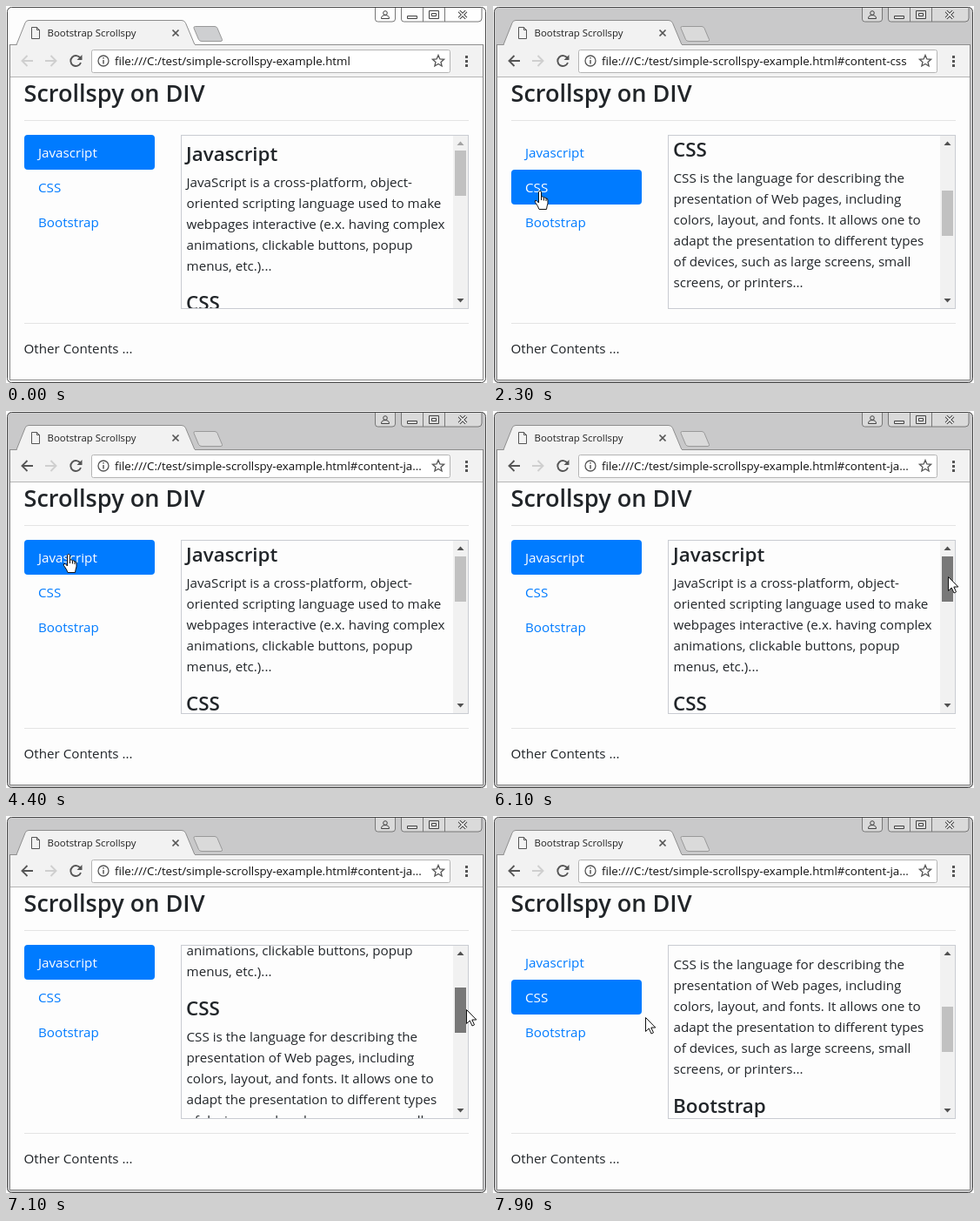
These frames come from a looping animation (553x433 px, 8000 ms). An HTML page:

```html
<!DOCTYPE html>
<html lang="en">
<head>
<meta charset="utf-8">
<title>Bootstrap Scrollspy</title>
<style>
  html, body { margin: 0; width: 100%; height: 100%; overflow: hidden; background: #fdfdfd; }
  svg { display: block; }
  text { font: 15.2px "Open Sans", "Noto Sans", sans-serif; fill: #212529; white-space: pre; }
  .h3 { font-size: 27.1px; font-weight: 600; }
  .h4 { font-size: 22.4px; font-weight: 600; }
  .tab { font-size: 11.4px; fill: #222; }
  .url { font-size: 13.35px; fill: #111; }
  #win { --frame: #fdfdfd; --plus: #cecfd1; }
  #win.focus { --frame: #c9c9ca; --plus: #dadada; }
  .frame { fill: var(--frame); }
  .line { fill: none; stroke: #555; }
  .ctl { fill: none; stroke: #777; }
</style>
</head>
<body>
<svg id="win" width="553" height="433" viewBox="0 0 553 433">
  <rect width="553" height="433" fill="#fdfdfd"/>
  <rect class="frame" x="1.5" y="1.5" width="550" height="431" rx="5" stroke="#444"/>
  <rect x="4.5" y="44.5" width="544" height="385" fill="#fdfdfd" stroke="#8a8a8a"/>

  <!-- window buttons -->
  <g class="ctl">
    <path d="M424.500 2V15q0 3 3 3H444q3.500 0 3.500-3V2M454.500 2V15q0 3 3 3H543q4 0 4-4V2M479.500 2V18M504.500 2V18" fill="#fff" fill-opacity=".3"/>
    <g stroke="#444">
      <circle cx="436" cy="8" r="2.300"/>
      <path d="M431.500 14.500q0-4 4.500-4t4.500 4zM461.500 11.500h11v3h-11zM486.500 5.500h11v9h-11zM489.500 8.500h5v3h-5z"/>
      <path d="M521 6l8 8M529 6l-8 8" stroke-width="3.600"/>
      <path d="M521 6l8 8M529 6l-8 8" stroke="#fff" stroke-width="1.600"/>
    </g>
  </g>

  <!-- tab and toolbar -->
  <rect x="5" y="45" width="543" height="36" fill="#f2f2f2"/>
  <path d="M5 44.500H12L22 19.500Q23 16.500 26 16.500H202Q205 16.500 206.500 19.500L217 44.500H548" fill="#f2f2f2" stroke="#8e8e8e"/>
  <path d="M13 45H217" stroke="#f2f2f2" stroke-width="2"/>
  <path d="M5 81.500H548" stroke="#b6b6b6"/>
  <path d="M217.500 23.500H240q2 0 3 2l5.500 13q.5 2-1.500 2H225q-2.500 0-3.500-2l-5.500-13q-.5-2 1.500-2z" fill="var(--plus)" stroke="#999"/>
  <path class="line" d="M29.500 24.500h6l3 3v10h-9zM35.500 24.500v3h3"/>
  <text class="tab" x="47.500" y="35">Bootstrap Scrollspy</text>
  <path class="line" d="M191.500 27.500l7 7M198.500 27.500l-7 7" stroke-width="1.700"/>
  <g fill="none" stroke-width="1.900">
    <path id="back" d="M31 63H18.500M24.500 57l-6 6 6 6"/>
    <path d="M45 63H57.500M51.500 57l6 6-6 6" stroke="#cfcfcf"/>
    <path d="M85.500 60A6 6 0 1 0 86 65" stroke="#555"/>
    <path d="M87.500 56v6h-6z" fill="#555"/>
  </g>
  <rect x="98.500" y="50.500" width="412" height="26" rx="2" fill="#fff" stroke="#b4b4b4"/>
  <circle class="line" cx="112" cy="63" r="6" stroke-width="1.300"/>
  <path class="line" d="M112 62v4.500M112 59v1.500" stroke-width="1.500"/>
  <text class="url" id="url" x="125" y="68"></text>
  <path class="line" d="M497 56.500l1.900 4.400 4.700.4-3.600 3.100 1.100 4.600-4.100-2.500-4.100 2.500 1.100-4.600-3.600-3.100 4.700-.4z" stroke-width="1.300"/>
  <path d="M529.500 57v3M529.500 62v3M529.500 67v3" stroke="#555" stroke-width="3"/>

  <!-- page -->
  <text class="h3" x="20.500" y="110">Scrollspy on DIV</text>
  <path d="M21 131.500H532M21 364.500H532" stroke="#e4e4e4"/>
  <text x="20.500" y="399">Other Contents ...</text>
  <rect id="pill" x="21" width="150" height="40" rx="4" fill="#007bff"/>
  <g id="nav"></g>
  <rect x="201.500" y="148.500" width="330" height="199" fill="#fdfdfd" stroke="#c9ccd2"/>
  <svg id="view" x="202" y="149" width="313" height="198"></svg>
  <rect x="514" y="149" width="17" height="198" fill="#f1f1f1"/>
  <path id="up" d="M518.500 160h8l-4-4.500z"/>
  <path d="M518.500 336h8l-4 4.500z" fill="#505050"/>
  <rect id="thumb" x="516" width="13" height="52"/>

  <g id="cursor" fill="#fff" stroke="#111" stroke-linejoin="round">
    <path id="arrow" d="M.5.5V16.500l3.700-3.500 2.800 6 2.500-1.200-2.700-5.800h5z"/>
    <path id="hand" d="M-1.500 14V1.500Q0-1 1.500 1.500V7Q3 6 4.500 8 6 7 7 9 9 8.500 9 11V15Q8 17.500 7.500 21.500H-1Q-2 18-5.500 13.500-6.500 10.500-4 11.500L-1.500 14M1.500 7v4M4.500 8v3.500M7 9v3"/>
  </g>
</svg>
<script>
const $ = id => document.getElementById(id);
const sections = [
  ['Javascript', 178, ['JavaScript is a cross-platform, object-', 'oriented scripting language used to make',
    'webpages interactive (e.x. having complex', 'animations, clickable buttons, popup', 'menus, etc.)...']],
  ['CSS', 349, ['CSS is the language for describing the', 'presentation of Web pages, including',
    'colors, layout, and fonts. It allows one to', 'adapt the presentation to different types',
    'of devices, such as large screens, small', 'screens, or printers...']],
  ['Bootstrap', 544, ['Bootstrap is an open source toolkit for', 'developing with HTML, CSS, and JS.',
    'Quickly prototype your ideas or build your', 'entire app with our Sass variables and',
    'mixins, responsive grid system, extensive', 'prebuilt components, and powerful plugins', 'built on jQuery...']]
];

function addText(parent, x, y, str, cls = '') {
  const el = document.createElementNS('http://www.w3.org/2000/svg', 'text');
  el.setAttribute('x', x);
  el.setAttribute('y', y);
  el.setAttribute('class', cls);
  el.textContent = str;
  parent.append(el);
  return el;
}

const links = sections.map(([title, y, lines], i) => {
  addText($('view'), 207, y, title, 'h4');
  lines.forEach((line, n) => addText($('view'), 207.5, y + 30 + n * 24, line));
  return addText($('nav'), 37, 174 + i * 40, title);
});

// Keys are [time, value, ...]; neighbours 100 ms apart act as jumps.
const scrollKeys = [[0, 0], [1600, 0], [1700, 176], [3200, 176], [3300, 371], [4300, 371], [4400, 5],
  [6300, 5], [6600, 37], [7100, 120], [7200, 145], [7300, 176], [7400, 203], [8000, 203]];
const cursorKeys = [[0, 529, 52], [400, 529, 52], [1100, 54, 203], [2200, 54, 203], [2300, 54, 212],
  [2900, 64, 250], [3600, 64, 250], [4000, 72, 164], [4600, 72, 164], [4700, 73, 165], [4900, 73, 165],
  [5600, 543, 186], [5800, 523, 190], [6300, 523, 190], [6600, 524, 201], [7100, 529, 222],
  [7400, 530, 243], [7900, 175, 231], [8000, 175, 231]];

function at(keys, t) {
  const i = keys.findIndex(k => k[0] > t);
  const a = keys[i - 1], b = keys[i];
  const p = (t - a[0]) / (b[0] - a[0]);
  return a.slice(1).map((v, n) => v + (b[n + 1] - v) * p);
}

function draw(now) {
  const t = Math.floor(now % 8000 / 100) * 100;
  const scroll = Math.round(at(scrollKeys, t)[0]);
  const [x, y] = at(cursorKeys, t).map(Math.round);
  const active = scroll >= 361 ? 2 : scroll >= 166 ? 1 : 0;
  const over = t >= 400 && x >= 21 && x < 171 && y >= 148 && y < 268 ? Math.floor((y - 148) / 40) : -1;

  $('win').classList.toggle('focus', t >= 1500);
  $('back').setAttribute('stroke', t < 1700 ? '#cfcfcf' : '#555');
  const hash = t < 1700 ? '' : t < 3300 ? '#content-css' : t < 4400 ? '#content-bo...' : '#content-ja...';
  $('url').textContent = 'file:///C:/test/simple-scrollspy-example.html' + hash;

  $('pill').setAttribute('y', 148 + active * 40);
  links.forEach((el, i) => el.style.fill = i === active ? '#fff' : i === over ? '#0056b3' : '#007bff');
  $('view').setAttribute('viewBox', `202 ${149 + scroll} 313 198`);

  const top = 166 + Math.round(scroll * .2615);
  const onThumb = x >= 516 && x < 530 && y >= top && y < top + 52;
  $('thumb').setAttribute('y', top);
  $('thumb').setAttribute('fill', t >= 6100 && t < 7500 ? '#787878' : onThumb ? '#a8a8a8' : '#c1c1c1');
  $('up').setAttribute('fill', scroll ? '#505050' : '#a3a3a3');

  $('cursor').setAttribute('transform', `translate(${x} ${y})`);
  $('cursor').style.display = t < 400 ? 'none' : '';
  $('arrow').style.display = over < 0 ? '' : 'none';
  $('hand').style.display = over < 0 ? 'none' : '';
}

const start = performance.now();
function tick() {
  draw(performance.now() - start);
  requestAnimationFrame(tick);
}
tick();
</script>
</body>
</html>
```
